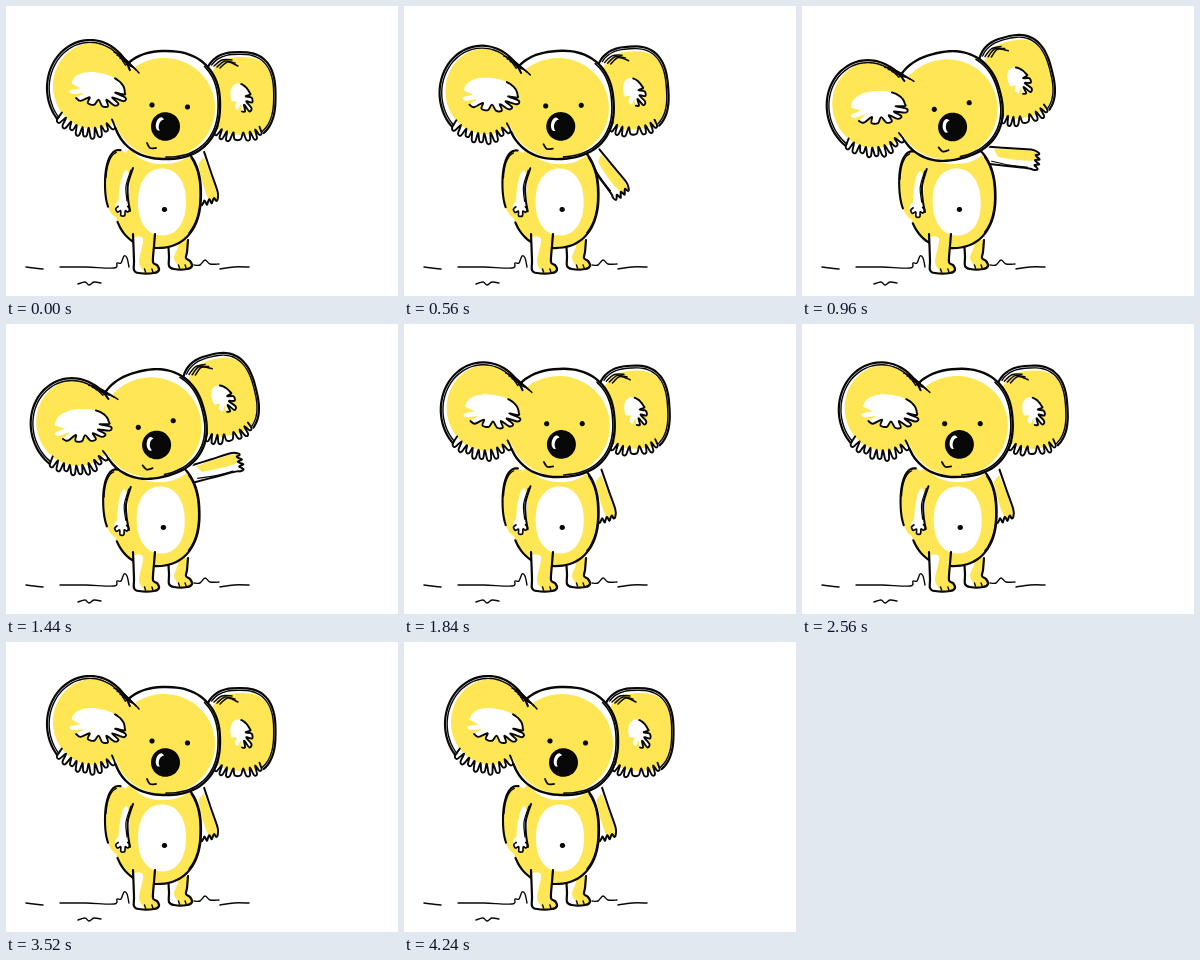
An HTML page that plays this animation: 392x290 px, repeating every 4800 ms.

```html
<!DOCTYPE html>
<html lang="en">
<head>
<meta charset="utf-8">
<title>Waving koala</title>
<style>
html, body { margin: 0; width: 100%; height: 100%; overflow: hidden; background: #fff; }
svg { display: block; width: 100vw; height: 100vh; }
</style>
</head>
<body>
<svg viewBox="0 0 392 290">
  <g id="ground"></g>
  <g id="backLeg"></g>
  <g id="body"><g id="arm"></g><g id="torso"></g></g>
  <g id="frontLeg"></g>
  <g id="head">
    <g id="rightEar"></g><g id="skull"></g><g id="leftEar"></g><g id="face"></g>
    <g id="open"></g><g id="shut"></g>
  </g>
</svg>
<script>
const YELLOW = '#ffe654', INK = '#080808', WHITE = '#fff';
const $ = id => document.getElementById(id);

let seed = 7;
const random = () => (seed = seed * 16807 % 2147483647) / 2147483647;
const jitter = size => (random() - 0.5) * size;

function addPath(id, d, attrs) {
  const el = document.createElementNS('http://www.w3.org/2000/svg', 'path');
  for (const [k, v] of Object.entries({ d, ...attrs })) el.setAttribute(k, v);
  $(id).appendChild(el);
}

// Smooth curve through [x, y] points
function curve(p) {
  const at = i => p[Math.max(0, Math.min(p.length - 1, i))];
  let d = 'M' + p[0];
  for (let i = 0; i < p.length - 1; i++) {
    const [a, b, c, e] = [-1, 0, 1, 2].map(k => at(i + k));
    const h1 = b.map((v, k) => v + (c[k] - a[k]) / 6);
    const h2 = c.map((v, k) => v - (e[k] - b[k]) / 6);
    d += `C${h1} ${h2} ${c}`;
  }
  return d;
}

const fill = (id, pts, color = YELLOW) => addPath(id, curve(pts) + 'Z', { fill: color });

const line = (id, pts, width = 2, color = INK) => addPath(id, curve(pts), {
  fill: 'none', stroke: color, 'stroke-width': width, 'stroke-linecap': 'round', 'stroke-linejoin': 'round'
});

// Superellipse: n = 2 is an ellipse, larger is squarer
const oval = (cx, cy, rx, ry, n = 2, turn = 0) => ({ cx, cy, rx, ry, n, turn });

// Point at angle deg (0 right, 90 down), grow scales the radius
function on(o, deg, grow = 1) {
  const bend = v => Math.sign(v) * Math.abs(v) ** (2 / o.n) * grow;
  const a = deg * Math.PI / 180, r = o.turn * Math.PI / 180;
  const x = o.rx * bend(Math.cos(a)), y = o.ry * bend(Math.sin(a));
  return [o.cx + x * Math.cos(r) - y * Math.sin(r), o.cy + x * Math.sin(r) + y * Math.cos(r)];
}

function arc(o, from, to, grow) {
  const n = Math.ceil(Math.abs(to - from) / 8);
  return Array.from({ length: n + 1 }, (_, i) => on(o, from + (to - from) * i / n, grow));
}

const paint = (id, o, color) => fill(id, arc(o, 0, 360), color);

// Row of rounded tufts along an oval's edge
function fringe(o, from, to, count, depth) {
  const pts = [], step = (to - from) / count;
  for (let i = 0; i < count; i++) {
    const a = from + step * i, tip = 1 + jitter(depth * 0.5);
    pts.push(on(o, a, 1 - depth), on(o, a + step * 0.3, tip), on(o, a + step * 0.75, tip));
  }
  return [...pts, on(o, to, 1 - depth)];
}

// White patch of hair with a ragged lower edge
function tuft(id, o, count, depth) {
  const hair = fringe(o, 0, 165, count, depth);
  fill(id, [...arc(o, 180, 360), ...hair], WHITE);
  line(id, [...arc(o, 300, 360), ...hair.slice(0, -4)], 1.9);
}

function leg(id, x, top, bottom, w) {
  const side = [[x, top], [x + 1, bottom - 12], [x + 1, bottom - 2]];
  const foot = [[x + 6, bottom + 1], [x + w, bottom + 1], [x + w + 5, bottom - 2], [x + w + 3, bottom - 7]];
  const back = [[x + w - 1, bottom - 10], [x + w, top + 12], [x + w + 1, top]];
  fill(id, [...side, ...foot, ...back]);
  fill(id, [[x, top + 3], [x + 10, top + 5], [x + 6, bottom - 10], [x + 11, bottom], ...side.slice().reverse()], WHITE);
  line(id, [...side, ...foot, ...back], 2.2);
  for (const k of [0.55, 0.9]) line(id, [[x + w * k, bottom - 3], [x + w * k + 1, bottom]], 1.4);
}

const skull = oval(160, 99, 54, 54, 2.3);
const leftEar = oval(84, 82, 43, 48);
const rightEar = oval(233, 90, 36.5, 44, 2.6);
const torso = oval(151, 188, 44, 54, 2.3);
const sleeve = oval(113, 178, 14, 34, 2.2);

function drawGround() {
  line('ground', [[20, 261], [28, 262], [37, 263]], 1.5);
  line('ground', [[54, 261], [80, 261], [108, 262], [111, 257], [115, 257], [118, 250], [121, 252], [123, 261]], 1.4);
  line('ground', [[72, 278], [79, 276], [83, 279], [88, 276], [95, 277]], 1.4);
  line('ground', [[188, 259], [194, 259], [199, 254], [204, 258], [213, 258]], 1.4);
  line('ground', [[214, 263], [228, 261], [243, 261]], 1.5);
}

// Drawn pointing right from the shoulder at 0,0
function drawArm() {
  const hand = [];
  for (let y = -8; y <= 8; y += 5) hand.push([47, y], [50 - Math.abs(y) / 5, y + 2], [45, y + 3]);
  const edge = [[-2, -8], [20, -9], [40, -10], ...hand, [40, 9], [20, 9], [-2, 9]];
  fill('arm', edge, WHITE);
  fill('arm', [[3, -6], [22, -8], [45, -8], [46, 0], [30, 2], [8, 1]]);
  line('arm', edge, 2);
  line('arm', [[2, 6], [20, 8], [38, 8]], 1.2);
}

function drawTorso() {
  paint('torso', torso);
  paint('torso', sleeve);
  paint('torso', oval(157, 106, 42, 52, 2.3), WHITE);
  paint('torso', oval(118, 187, 5, 23, 2, 6), WHITE);
  paint('torso', oval(116, 201, 7, 7), WHITE);
  paint('torso', oval(156, 196, 24, 33.5, 2.2), WHITE);
  paint('torso', oval(158.5, 203.5, 2.7, 2.5), INK);
  line('torso', arc(sleeve, 275, 140), 2.1);
  line('torso', arc(sleeve, 260, 190, 0.94), 1.3);
  line('torso', [[127, 162], [122, 178], [122, 192], [124, 205]], 2);
  line('torso', [[125, 164], [120, 180], [121, 195]], 1.2);
  line('torso', fringe(oval(117, 200, 8, 9), 5, 175, 3, 0.4), 1.7);
  line('torso', arc(torso, 310, 512), 2.2);
  line('torso', arc(torso, 320, 405, 0.98), 1.4);
}

function drawEar(id, ear, yellow, edge, hem) {
  paint(id, yellow);
  line(id, arc(ear, ...edge), 2.2);
  line(id, arc(ear, edge[0] * 0.96 + edge[1] * 0.04, edge[1], 0.95), 1.4);
  line(id, fringe(ear, ...hem), 1.9);
}

function drawHead() {
  drawEar('rightEar', rightEar, oval(235, 90, 33, 39, 2.6), [215, 413], [53, 140, 8, 0.17]);
  tuft('rightEar', oval(235, 92, 10, 15, 2, -20), 4, 0.5);

  paint('skull', skull, WHITE);
  paint('skull', oval(158, 102, 51, 50));
  line('skull', arc(skull, 228, 518), 2.4);
  line('skull', arc(skull, 315, 450, 0.965), 1.6);

  drawEar('leftEar', leftEar, oval(87, 80, 40, 43), [338, 140], [142, 52, 9, 0.17]);
  tuft('leftEar', oval(92, 83, 27, 16, 2.2, 12), 6, 0.35);
  for (let i = 0; i < 5; i++) {
    const x = 108 + i * 3, y = 46 + i * 3;
    line('leftEar', [[x, y], [x + 8, y + 4], [x + 13, y + 9]], 1.5);
    if (i < 3) line('rightEar', [[208 + i * 3, 60 + i], [216 + i * 3, 54 + i], [226 + i * 3, 54 + i * 3]], 1.5);
  }
}

function drawFace() {
  paint('face', oval(159.5, 120.5, 14.5, 14.3), INK);
  paint('face', oval(154, 118, 4, 6.8, 2, 15), WHITE);
  paint('face', oval(156.5, 119.5, 3.6, 5.8, 2, 15), INK);
  line('face', [[141, 137], [144, 142], [150, 142]], 1.8);
  for (const [x, y] of [[146, 99], [181.5, 101]]) {
    paint('open', oval(x, y, 2.6, 2.6), INK);
    line('shut', [[x - 3, y], [x, y + 1], [x + 3, y]], 1.8);
  }
}

const LOOP = 4800, STEP = 80;
const BLINKS = [2400, 4080];

const clamp = (v, a, b) => Math.max(a, Math.min(b, v));
const ramp = (t, a, b, power = 1) => 1 - (1 - clamp((t - a) / (b - a), 0, 1)) ** power;

function render(ms) {
  const t = Math.floor((ms % LOOP) / STEP) * STEP;
  const rise = ramp(t, 480, 960, 2), drop = ramp(t, 1600, 1840), settle = ramp(t, 3200, 3520);
  const wave = 0.5 - 0.5 * Math.cos((clamp(t, 960, 1440) - 960) / 160 * Math.PI);
  const tilt = -14 * rise + 10.7 * drop + 3.3 * settle;
  const lift = (66 * rise + 21 * wave) * (1 - drop);
  const blink = BLINKS.some(b => t >= b && t < b + 160);
  $('head').setAttribute('transform', `rotate(${tilt} 157 157)`);
  $('body').setAttribute('transform', `rotate(${tilt * 0.12} 157 240)`);
  $('arm').setAttribute('transform', `translate(191 150) rotate(${74 - lift})`);
  $('open').style.display = blink ? 'none' : '';
  $('shut').style.display = blink ? '' : 'none';
}

drawGround();
leg('backLeg', 162, 234, 262, 19);
drawArm();
drawTorso();
leg('frontLeg', 127, 228, 266, 21);
drawHead();
drawFace();

const start = performance.now();
function tick() {
  render(performance.now() - start);
  requestAnimationFrame(tick);
}
tick();
</script>
</body>
</html>
```
